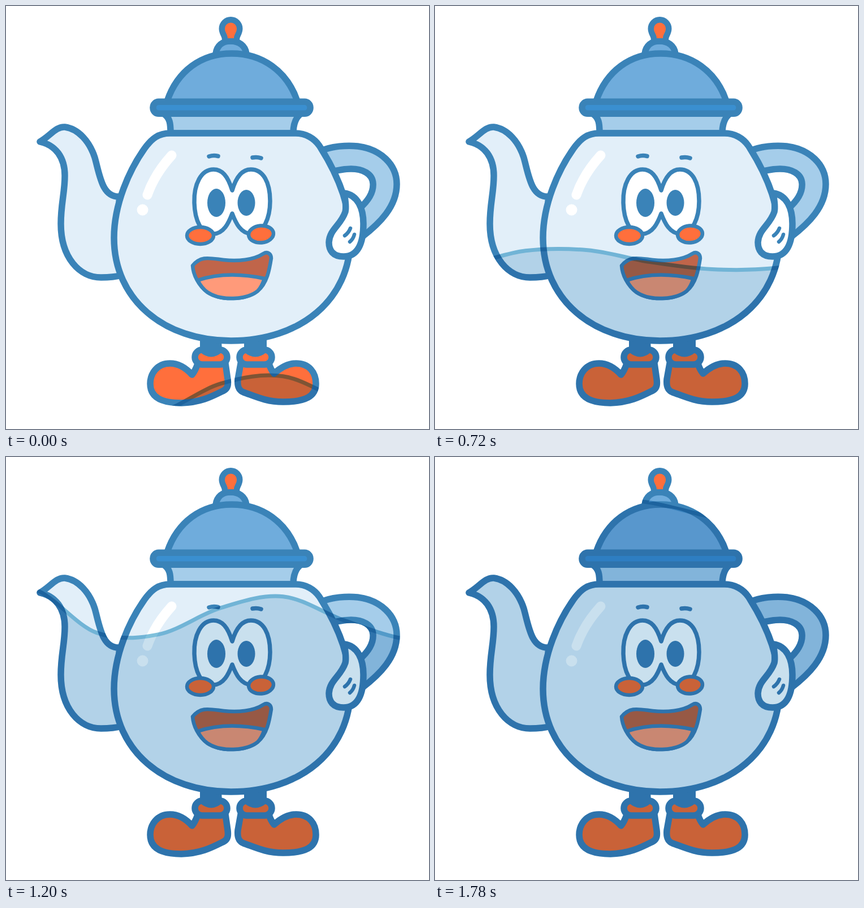
These frames come from a looping animation (748 by 748 pixels, 1.8 s). An HTML page:

```html
<!DOCTYPE html>
<html lang="en">
<head>
<meta charset="utf-8">
<title>Teapot filling up</title>
<style>
  html, body { margin: 0; width: 100%; height: 100%; overflow: hidden; background: #fff; }
  svg { display: block; width: 100vw; height: 100vh; isolation: isolate; }
  #pot { stroke: #3a83b8; stroke-width: 11.5; stroke-linecap: round; stroke-linejoin: round; }
  .glass { fill: #e2eff9; }
  .pale { fill: #a5cdea; }
  .sky { fill: #6facdc; }
  .orange { fill: #ff6f3c; }
  .white { fill: #fff; }
  .ink { fill: #3a83b8; stroke: none; }
  .line { fill: none; }
  .thin { stroke-width: 6.5; }
  #mask { mask-type: alpha; }
  #water { mix-blend-mode: multiply; }
</style>
</head>
<body>
<svg viewBox="0 0 748 748">
  <defs>
    <mask id="mask" maskUnits="userSpaceOnUse" x="0" y="0" width="748" height="748"><use href="#pot"/></mask>
  </defs>
  <rect width="748" height="748" fill="#fff"/>
  <g id="pot">
    <!-- handle and spout -->
    <path class="pale" d="M552 258C575 247 605 246 622 248C662 253 691 280 691 315C691 355 660 385 630 408L625 358C640 345 650 330 649 314C648 296 630 288 610 288C598 288 588 290 570 294Z"/>
    <path class="glass" d="M60 240C78 230 88 213 104 214C128 217 148 240 157 268C166 300 170 338 200 337L205 476C190 480 178 480 168 480C130 480 97 445 97 385C97 350 104 330 104 300C104 268 88 246 60 240Z"/>
    <!-- feet -->
    <path class="orange" d="M329 652C318 640 305 632 290 632C267 632 255 650 255 668C255 692 275 702 310 702C345 701 365 690 385 680C393 676 393 668 392 660L388 632L340 630C337 638 335 645 329 652Z"/>
    <path class="orange" d="M474 650C485 640 497 632 513 632C536 632 548 648 548 668C548 690 530 700 490 700C460 700 440 690 420 683C410 679 409 670 410 660L415 632L465 632C467 640 470 645 474 650Z"/>
    <rect class="orange" x="334" y="608" width="57" height="26" rx="13"/>
    <rect class="orange" x="413" y="608" width="57" height="26" rx="13"/>
    <path class="ink" d="M343 590H381L382 612Q363 629 343 612ZM421 590H461V612Q441 629 421 612Z"/>
    <!-- body, neck and lid -->
    <path class="pale" d="M278 190C290 197 291 208 291 225H508C508 208 512 197 522 190"/>
    <path class="glass" d="M290 225H512C530 225 545 234 554 247C585 295 609 350 609 410C609 520 520 592 398 592C280 592 191 520 191 410C191 350 218 290 245 252C258 234 270 225 290 225Z"/>
    <path class="sky" d="M371 84C373 70 383 62 397 62C412 62 423 70 425 84"/>
    <path class="sky" d="M285 168C303 115 345 84 399 84C453 84 497 115 515 168"/>
    <rect x="260" y="169.3" width="278" height="21" rx="10" fill="#3a8fd0"/>
    <path class="orange" stroke-width="21" paint-order="stroke" style="stroke-width:21" d="M392 57C392 50 387 47 387 40A10.5 10.5 0 0 1 408 40C408 47 403 50 403 57Z"/>
    <!-- shine -->
    <path class="line" stroke="#fff" style="stroke:#fff;stroke-width:17" d="M293 264C274 285 259 308 250 334"/>
    <circle cx="241.5" cy="360.5" r="10" fill="#fff" stroke="none"/>
    <!-- face -->
    <g class="thin">
      <path class="line" style="stroke-width:7.5" d="M359 266Q367 263.500 375 265.500M436 268Q444 266.500 451 269"/>
      <path class="white" style="stroke-width:7.5" d="M400 326C392 300 382 289 367 289C345 289 332 315 333 348C334 380 345 403 366 403C385 403 394 383 400 367C406 383 415 403 435 403C455 403 467 375 467 345C467 312 455 289 433 289C417 289 407 302 400 326Z"/>
      <ellipse class="ink" cx="372" cy="348" rx="16" ry="25"/>
      <ellipse class="ink" cx="425" cy="348" rx="15.500" ry="23"/>
      <ellipse class="orange" cx="343.500" cy="406" rx="23.500" ry="15"/>
      <ellipse class="orange" cx="451" cy="403.500" rx="22" ry="15" transform="rotate(-5 451 403.500)"/>
      <path fill="#c0654a" d="M330 459C345 441 360 446 385 449C410 452 438 449 455 438C463 433 469 439 469 446C466 465 462 490 445 504C425 520 380 522 356 506C340 494 331 475 330 459Z"/>
      <path fill="#ff9a7a" d="M339 485C375 473 415 473 457 482C454 491 450 499 445 504C425 520 380 522 356 506C349 501 343 493 339 485Z"/>
    </g>
    <!-- hand -->
    <path class="white" d="M598 331C622 334 632 358 632 385C632 420 622 443 597 443C578 443 571 432 571 418C572 395 592 388 600 364C602 355 600 342 598 331Z"/>
    <path class="line thin" d="M599 406Q606 401 609 393M608 417Q614 412 616 404"/>
  </g>
  <g id="water" mask="url(#mask)">
    <path id="fill" fill="#c9e0ee"/>
    <path id="crest" fill="none" stroke="#7fc0db" stroke-width="7"/>
  </g>
</svg>
<script>
  const LOOP = 1800, X0 = 50, STEP = 110;
  // Surface heights at evenly spaced x positions: [time, ...heights]
  const waves = [
    [0, 690, 730, 720, 668, 655, 700, 730],
    [520, 500, 487, 494, 523, 530, 498, 478],
    [720, 458, 433, 432, 453, 466, 464, 445],
    [960, 342, 369, 385, 370, 354, 367, 392],
    [1200, 234, 311, 314, 267, 247, 290, 323],
    [1560, 165, 178, 182, 167, 152, 148, 155],
    [1780, 90, 75, 72, 81, 106, 118, 100]
  ];
  const fill = document.getElementById('fill');
  const crest = document.getElementById('crest');

  function heightsAt(t) {
    let i = 0;
    while (i < waves.length - 2 && t >= waves[i + 1][0]) i++;
    const [t0, ...a] = waves[i], [t1, ...b] = waves[i + 1];
    const k = (t - t0) / (t1 - t0);
    return a.map((y, j) => y + (b[j] - y) * k);
  }

  // Smooth curve through the heights
  function curve(ys) {
    const slope = i => ((ys[i + 1] ?? ys[i]) - (ys[i - 1] ?? ys[i])) / 6;
    let d = `M${X0} ${ys[0]}`;
    for (let i = 1; i < ys.length; i++) {
      const x = X0 + i * STEP;
      d += `C${x - STEP * 2 / 3} ${ys[i - 1] + slope(i - 1)} ${x - STEP / 3} ${ys[i] - slope(i)} ${x} ${ys[i]}`;
    }
    return d;
  }

  function draw(now) {
    const d = curve(heightsAt(now % LOOP));
    crest.setAttribute('d', d);
    fill.setAttribute('d', d + `V760H${X0}Z`);
    requestAnimationFrame(draw);
  }
  draw(0);
</script>
</body>
</html>
```
